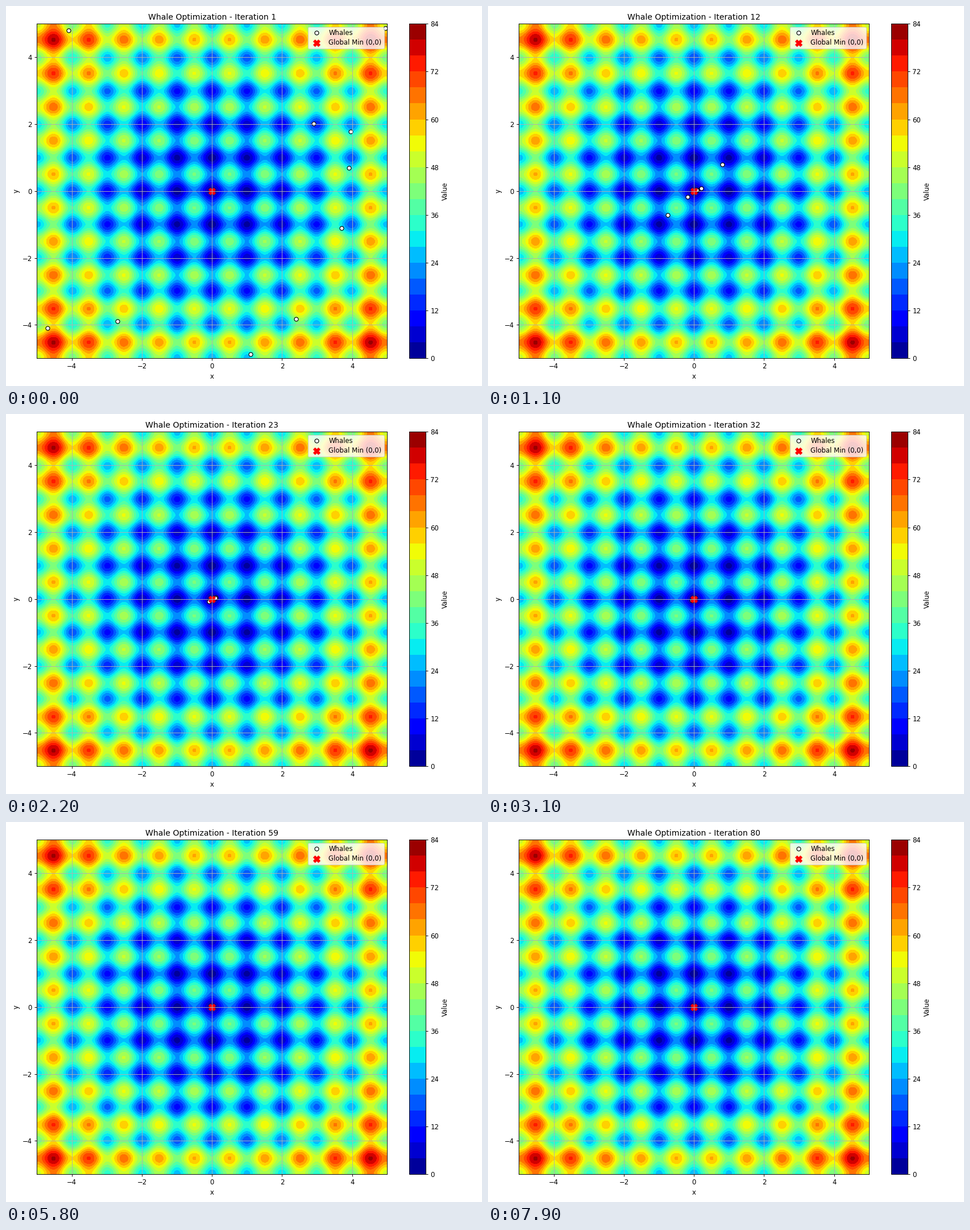
A matplotlib script that plays this animation: 837 by 669 pixels, repeating every 8 s.

```python
import numpy as np
import matplotlib.pyplot as plt
from matplotlib.animation import FuncAnimation

DPI, LAYOUT_DPI = 83.7, 100
WIDTH, HEIGHT = 837, 669
FRAMES, INTERVAL = 80, 100
BOUND, MAX_ITER = 5.0, 100

START = np.array([(-4.1, 4.8), (4.94, 4.87), (2.9, 2.02), (3.95, 1.78), (3.9, 0.7),
                  (3.7, -1.1), (2.4, -3.83), (1.1, -4.88), (-2.7, -3.9), (-4.7, -4.1)])


def rastrigin(x, y):
    return 20 + x**2 + y**2 - 10 * (np.cos(2 * np.pi * x) + np.cos(2 * np.pi * y))


def reach(n):
    """Largest distance from the prey: the whole area, then closing in."""
    return BOUND * min(1, np.exp((26 - n) / 4))


def swim(pod, n, rng):
    """One step of the whale rules, with the prey at the origin."""
    a = 2 * (1 - n / MAX_ITER)
    new = np.empty_like(pod)
    for i, x in enumerate(pod):
        A = a * rng.uniform(-1, 1)
        C = rng.uniform(0, 2)
        if rng.random() < 0.5:
            # Circle the prey, or explore around another whale.
            lead = np.zeros(2) if abs(A) < 1 else pod[rng.integers(len(pod))]
            new[i] = lead - A * np.abs(C * lead - x)
        else:
            # Spiral towards the prey.
            k = rng.uniform(-1, 1)
            new[i] = np.abs(x) * np.exp(k) * np.cos(2 * np.pi * k)
    new = np.clip(new, -BOUND, BOUND)
    far = np.abs(new).max(axis=1, keepdims=True)
    return new * np.minimum(1, reach(n) / np.maximum(far, 1e-12))


rng = np.random.default_rng(7)
track = [START]
for n in range(1, FRAMES):
    track.append(swim(track[-1], n, rng))

# The small margin keeps the pixel size from being truncated.
fig, ax = plt.subplots(figsize=((WIDTH + 1e-4) / DPI, (HEIGHT + 1e-4) / DPI), dpi=DPI)

axis = np.linspace(-BOUND, BOUND, 200)
X, Y = np.meshgrid(axis, axis)
field = ax.contourf(X, Y, rastrigin(X, Y), levels=np.arange(0, 85, 4), cmap="jet")
fig.colorbar(field, ax=ax, label="Value", ticks=np.arange(0, 85, 12))

whales = ax.scatter(*START.T, s=36, c="white", edgecolors="black", label="Whales")
ax.scatter(0, 0, s=100, c="red", marker="X", label="Global Min (0,0)")
ax.set(xlim=(-BOUND, BOUND), ylim=(-BOUND, BOUND), xlabel="x", ylabel="y")
title = ax.set_title("Whale Optimization - Iteration 1")
ax.legend(loc="upper right", labelspacing=0.36, borderpad=0.35, scatteryoffsets=[0.45])
ax.grid(True)

# Margins are measured with the text at its nominal resolution.
fig.set_dpi(LAYOUT_DPI)
fig.tight_layout()
fig.set_dpi(DPI)


def update(n):
    whales.set_offsets(track[n])
    title.set_text(f"Whale Optimization - Iteration {n + 1}")
    return whales, title


anim = FuncAnimation(fig, update, frames=FRAMES, init_func=lambda: update(0),
                     interval=INTERVAL, repeat=True, repeat_delay=0)
plt.show()
```
